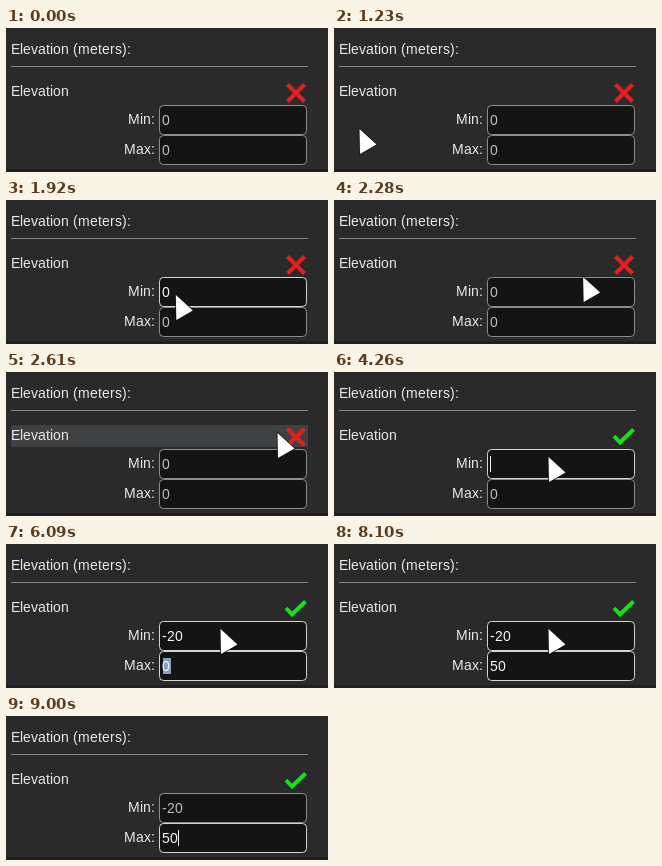
An HTML page with a canvas for the animation above (9.57 s loop, 322 px wide and 144 px high).

```html
<!DOCTYPE html>
<html lang="en">
<head>
<meta charset="utf-8">
<title>Elevation range</title>
<style>
html, body { margin: 0; width: 100%; height: 100%; overflow: hidden; background: #2a2a2a; }
canvas { display: block; }
</style>
</head>
<body>
<canvas id="stage" width="322" height="144"></canvas>
<script>
const LOOP = 9570, STEP = 30, BLINK = 900, TOGGLE = 2850;
const ctx = document.getElementById('stage').getContext('2d');
const point = (x, y) => ({ x, y });

// The pointer rests between moves; each move is a curve bent towards one point
const below = point(26, 146), corner = point(26, 101), overRow = point(272, 61);
const overMin = point(215, 85), away = point(326, 11);
const moves = [
  { start: 780, end: 990, from: below, bend: corner, to: corner },
  { start: 1530, end: 2490, from: corner, bend: point(241, 102), to: overRow },
  { start: 2730, end: 3060, from: overRow, bend: point(362, 108), to: overMin },
  { start: 8280, end: 8610, from: overMin, bend: point(270, 48), to: away }
];

// Focusing selects the old value; it is cleared, then one key press adds one character
const fields = [
  { name: 'Min:', y: 77, focus: 3210, blur: 6090, clear: 4230, value: '-20', keys: [5100, 5430, 5550] },
  { name: 'Max:', y: 107, focus: 6090, blur: LOOP, clear: 7170, value: '50', keys: [7170, 7200] }
];

function pointerAt(t) {
  const move = moves.filter(m => m.start <= t).pop();
  if (!move) return below;
  const { start, end, from, bend, to } = move;
  const k = Math.min(1, (t - start) / (end - start));
  const curve = axis => from[axis] * (1 - k) ** 2 + bend[axis] * 2 * k * (1 - k) + to[axis] * k * k;
  return point(curve('x'), curve('y'));
}

const inside = (p, x, y, w, h) => p.x >= x && p.x < x + w && p.y >= y && p.y < y + h;

function rect(x, y, w, h, color) {
  ctx.fillStyle = color;
  ctx.fillRect(x, y, w, h);
}

// Letters advance by whole pixels
const advance = char => Math.round(ctx.measureText(char).width);
const textWidth = text => [...text].reduce((sum, char) => sum + advance(char), 0);

function label(text, x, baseline, color = '#e8e8e8') {
  ctx.fillStyle = color;
  for (const char of text) {
    ctx.fillText(char, x, baseline);
    x += advance(char);
  }
}

function trace(...points) {
  ctx.beginPath();
  points.forEach(([x, y]) => ctx.lineTo(x, y));
}

function strokeLine(color, ...points) {
  ctx.strokeStyle = color;
  ctx.lineWidth = 4;
  trace(...points);
  ctx.stroke();
}

function drawMark(checked) {
  if (checked) return strokeLine('#17e01c', [280, 64], [286, 70.5], [299.5, 57.5]);
  for (const side of [-1, 1]) {
    strokeLine('#e3201f', [290 - 8.5 * side, 56.5], [290 + 8.5 * side, 73.5]);
  }
}

function drawField({ name, y, focus, blur, clear, value, keys }, t, pointer) {
  const focused = t >= focus && t < blur;
  const bright = focused || inside(pointer, 153, y, 148, 30);
  label(name, 149 - textWidth(name), y + 19);

  ctx.beginPath();
  ctx.roundRect(153.5, y + .5, 147, 29, 4);
  ctx.fillStyle = '#141414';
  ctx.fill();
  ctx.strokeStyle = bright ? '#d4d4d4' : '#8c8c8c';
  ctx.lineWidth = 1;
  ctx.stroke();

  const pressed = keys.filter(key => key <= t);
  const text = t < clear ? '0' : value.slice(0, pressed.length);
  const end = 156 + textWidth(text);
  if (focused && t < clear) rect(157, y + 7, end - 156, 16, 'rgba(168,206,255,.75)');
  label(text, 156, y + 20, bright ? '#f6f6f6' : '#bcbcbc');

  const idle = t - (pressed.pop() ?? clear);
  const caretOn = idle % (2 * BLINK) < BLINK;
  if (focused && t >= clear && caretOn) rect(end, y + 7, 1, 16, '#f0f0f0');
}

function drawPointer({ x, y }) {
  trace([x - .5, y], [x, y + 25], [x + 16.5, y + 15.5]);
  ctx.closePath();
  ctx.strokeStyle = '#111';
  ctx.lineWidth = 1.5;
  ctx.stroke();
  ctx.fillStyle = '#fff';
  ctx.fill();
}

function draw(t) {
  const pointer = pointerAt(t);
  ctx.font = '14px "Liberation Sans", Arial, sans-serif';

  rect(0, 0, 322, 144, '#2a2a2a');
  rect(0, 141, 322, 3, '#231c20');
  label('Elevation (meters):', 5, 26);
  rect(5, 38, 297, 1, '#858585');

  if (inside(pointer, 5, 53, 297, 22)) rect(5, 53, 297, 22, '#404143');
  label('Elevation', 5, 68);
  drawMark(t >= TOGGLE);
  fields.forEach(field => drawField(field, t, pointer));
  drawPointer(pointer);
}

function tick() {
  const t = performance.now() % LOOP;
  draw(Math.floor(t / STEP) * STEP);
  requestAnimationFrame(tick);
}
tick();
</script>
</body>
</html>
```
